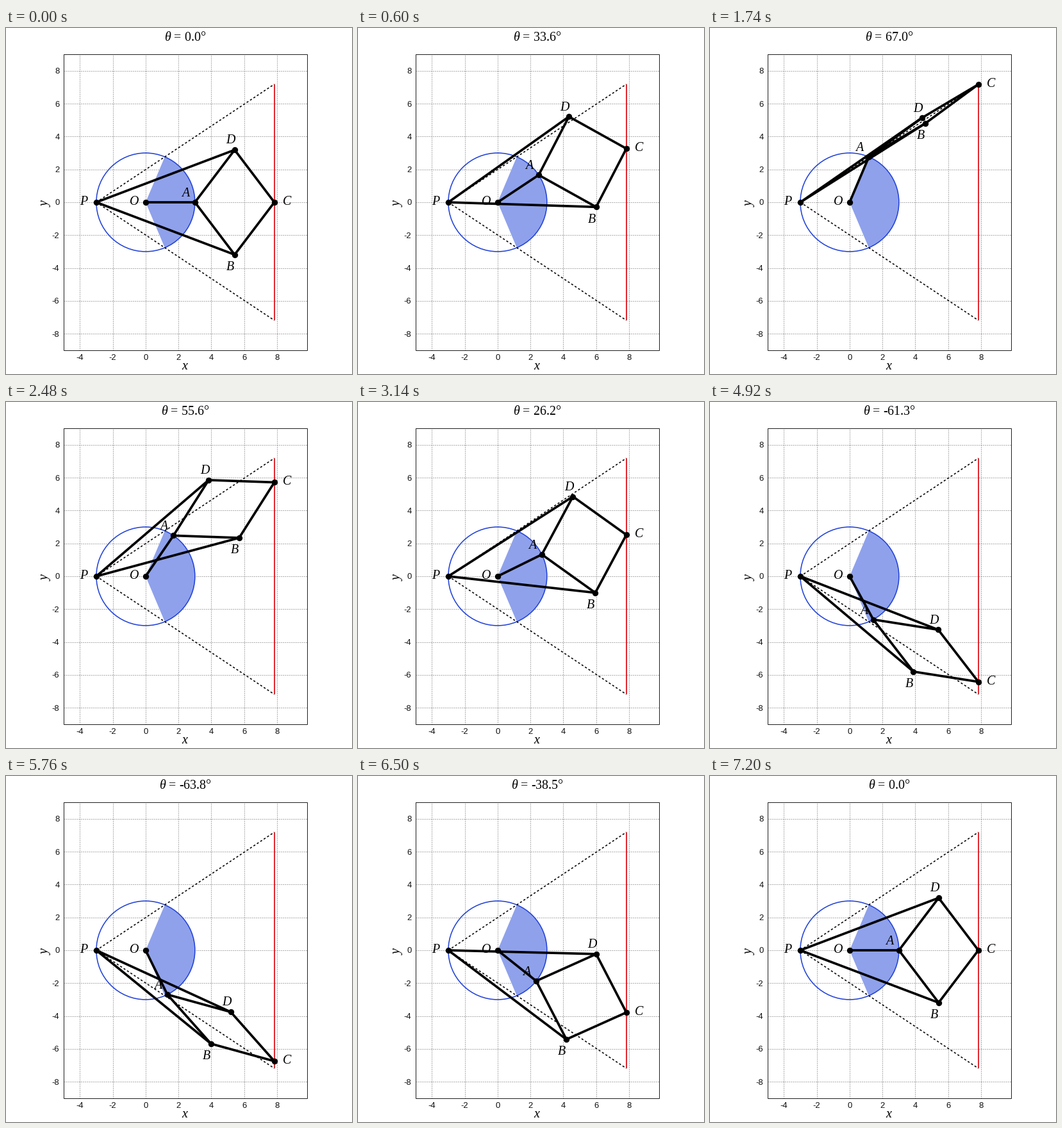
These frames come from a looping animation (540 px wide and 540 px high, 7220 ms). A matplotlib script:

```python
import numpy as np
import matplotlib.pyplot as plt
from matplotlib.animation import FuncAnimation
from matplotlib.patches import Circle, Rectangle, Wedge

SIZE, SCALE = 540, 25.65          # stage size, pixels per unit
CX, CY = 217.9, 272.0             # pixel position of the origin
R, LONG, SHORT = 3, 9, 4          # crank radius, long and short bars
K = LONG**2 - SHORT**2            # PA * PC stays constant
HALF = np.arccos((LONG - SHORT) / (2 * R))
LIMIT = 2 * HALF                  # largest crank angle
FRAMES = 361

plt.rcParams.update({
    "font.family": "Liberation Serif",
    "mathtext.fontset": "custom",
    "mathtext.it": "Liberation Serif:italic",
    "mathtext.rm": "Liberation Serif",
})

fig = plt.figure(figsize=(SIZE / 72, SIZE / 72), dpi=72, facecolor="white")
ax = fig.add_axes([0, 0, 1, 1])
ax.set_xlim(-CX / SCALE, (SIZE - CX) / SCALE)
ax.set_ylim((CY - SIZE) / SCALE, CY / SCALE)
ax.axis("off")

P, O = np.array([-R, 0.0]), np.zeros(2)
LEFT, RIGHT, BOTTOM, TOP = -5, 9.82, -9, 9


def line(points, **style):
    return ax.plot(*np.transpose(points), **style)[0]


def text(px, py, s, size=20, **style):
    """Place text at a pixel position measured from the top left."""
    style = {"ha": "center", "va": "baseline", **style}
    return ax.text((px - CX) / SCALE, (CY - py) / SCALE, s, fontsize=size, **style)


def draw_axes():
    grid = dict(color="#606060", lw=1, dashes=(1, 2), zorder=1)
    num = dict(size=13, family="Liberation Sans", color="#101010")
    for v in range(-8, 9, 2):
        line([(LEFT, v), (RIGHT, v)], **grid)
        text(83.5, CY - v * SCALE + 4.4, str(v), ha="right", **num)
        if v >= -4:
            line([(v, BOTTOM), (v, TOP)], **grid)
            text(CX + v * SCALE, 518, str(v), **num)
    ax.add_patch(Rectangle((LEFT, BOTTOM), RIGHT - LEFT, TOP - BOTTOM,
                           fill=False, ec="#202020", lw=1, zorder=1.5))
    text(278.7, 533, "x", style="italic")
    text(62, 274.5, "y", style="italic", rotation=90, va="center")


def draw_guides():
    deg = np.degrees(LIMIT)
    ax.add_patch(Wedge(O, R, -deg, deg, fc="#8fa1eb", ec="none", zorder=2))
    ax.add_patch(Circle(O, R, fill=False, ec="#2444d8", lw=1.6, zorder=2.1))
    x = K / (2 * R)
    end = np.array([x, x * np.tan(HALF)])
    for sign in (1, -1):
        line([P, P + end * (1, sign)], color="black", lw=1.6,
             dashes=(2, 2), zorder=2.3)
    line([P + end, P + end * (1, -1)], color="#e01018", lw=1.8, zorder=2.4,
         solid_capstyle="butt")


def pose(theta):
    """Joint positions for crank angle theta."""
    u = np.array([np.cos(theta / 2), np.sin(theta / 2)])
    n = np.array([-u[1], u[0]])
    near = 2 * R * u[0]
    far = K / near
    mid = P + u * (near + far) / 2
    h = n * np.sqrt(max(SHORT**2 - ((far - near) / 2)**2, 0))
    return {"O": O, "P": P, "A": P + near * u, "B": mid - h,
            "C": P + far * u, "D": mid + h}


draw_axes()
draw_guides()

bar = dict(color="black", lw=3.7, zorder=3, solid_joinstyle="round",
           solid_capstyle="round")
chain, strut = line([O, O], **bar), line([O, O], **bar)
joints = line([O], color="black", ls="", marker="o", ms=9.4, mew=0, zorder=4)

# label offsets in pixels, y downwards to the baseline
OFFSETS = {"O": (-17.5, 3.7), "P": (-19.7, 3.7), "A": (-15, -9),
           "B": (-7, 24.2), "C": (19.7, 4), "D": (-6.3, -9.8)}
labels = {k: text(0, 0, k, style="italic", zorder=5) for k in OFFSETS}
title = text(280, 20, "")


def update(i):
    theta = LIMIT * np.sin(np.radians(i % 360))
    q = pose(theta)
    chain.set_data(*np.transpose([q[k] for k in "OADCBPD"]))
    strut.set_data(*np.transpose([q[k] for k in "AB"]))
    joints.set_data(*np.transpose(list(q.values())))
    for k, (dx, dy) in OFFSETS.items():
        labels[k].set_position(q[k] + np.array([dx, -dy]) / SCALE)
    angle = round(np.degrees(theta), 1) + 0.0
    title.set_text(rf"$\theta$ = {angle:.1f}°")
    return [chain, strut, joints, title, *labels.values()]


anim = FuncAnimation(fig, update, frames=FRAMES, interval=20,
                     repeat=True, repeat_delay=0)
plt.show()
```
